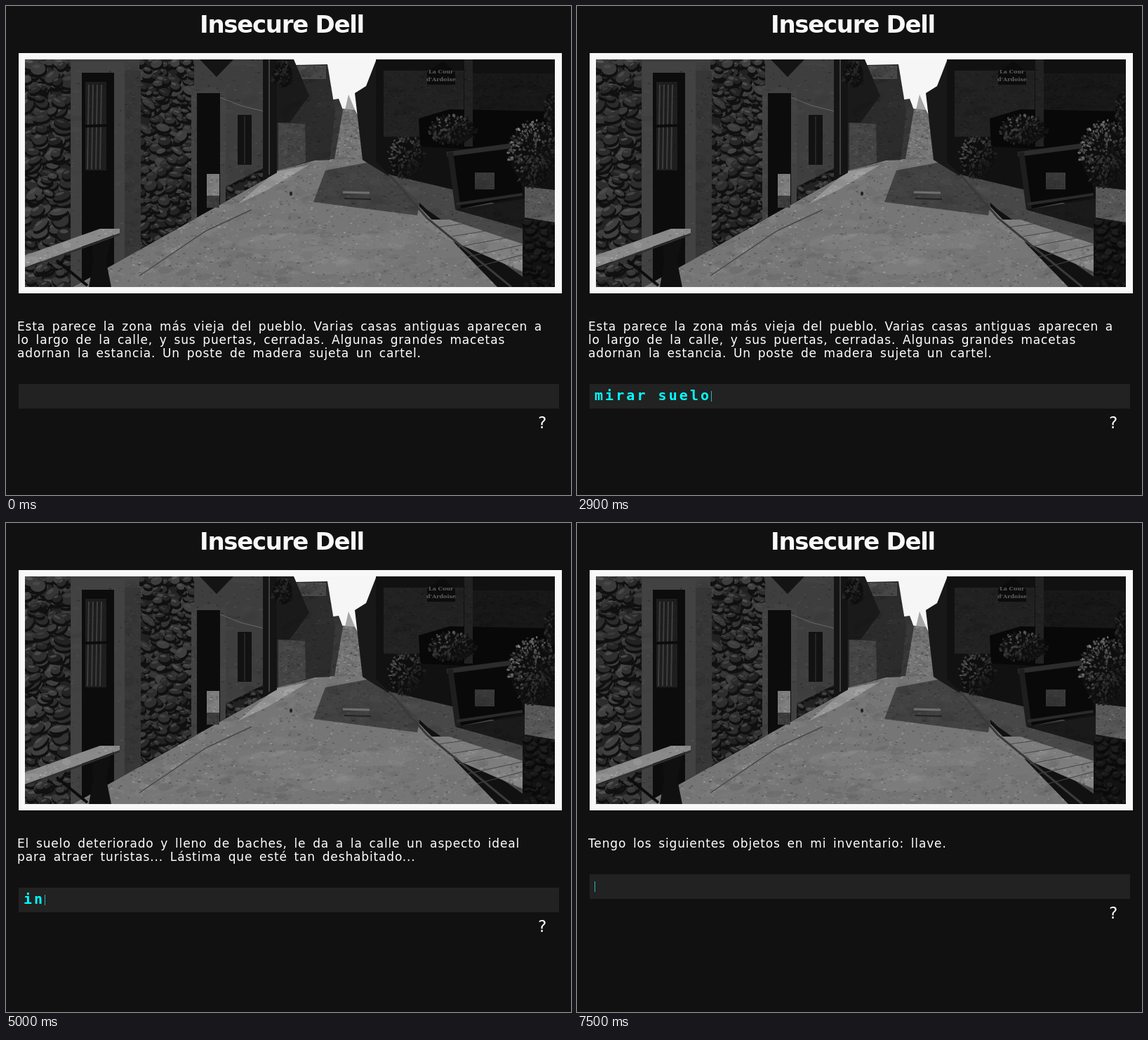
These frames come from a looping animation (805x696 px, 8 s). An HTML page with a canvas:

```html
<!DOCTYPE html>
<html lang="es">
<head>
<meta charset="utf-8">
<title>Insecure Dell</title>
<style>
  html, body { margin: 0; width: 100%; height: 100%; overflow: hidden; background: #111; }
  canvas, svg { position: absolute; left: 0; top: 0; width: 805px; height: 696px; }
  text { font-family: "DejaVu Sans", sans-serif; fill: #fff; white-space: pre; }
  #title { font-size: 34px; font-weight: bold; letter-spacing: -1.3px; text-anchor: middle; fill: #f8f8f8; }
  #story text { font-size: 17px; letter-spacing: .85px; word-spacing: 3.5px; }
  #help { font-size: 23px; }
  #typed { font: bold 20px "DejaVu Sans Mono", monospace; letter-spacing: 3.06px; fill: #0ff; }
</style>
</head>
<body>
<canvas id="photo" width="805" height="696"></canvas>
<svg viewBox="0 0 805 696">
  <text id="title" x="393" y="38">Insecure Dell</text>
  <g id="story">
    <text x="16" y="462"></text>
    <text x="16" y="481"></text>
    <text x="16" y="500"></text>
  </g>
  <g id="prompt">
    <rect x="18" y="538" width="770" height="35" fill="#222"/>
    <text id="typed" x="25" y="561"></text>
    <rect id="caret" y="548" width="1" height="15" fill="#2bb4bc"/>
    <text id="help" x="758" y="601">?</text>
  </g>
</svg>
<script>
const ctx = document.getElementById('photo').getContext('2d');
const LEFT = 27, TOP = 76, RIGHT = 782, BOTTOM = 400;

let seed = 7;
function rand() {
  seed = (seed + 0x6D2B79F5) | 0;
  let v = Math.imul(seed ^ (seed >>> 15), 1 | seed);
  v ^= v + Math.imul(v ^ (v >>> 7), 61 | v);
  return ((v ^ (v >>> 14)) >>> 0) / 4294967296;
}
const between = (a, b) => a + rand() * (b - a);
const gray = (v, alpha = 1) => `rgba(${v | 0},${v | 0},${v | 0},${alpha})`;

// Shapes are arrays of [x, y] corners.
const rect = (x0, y0, x1, y1) => [[x0, y0], [x1, y0], [x1, y1], [x0, y1]];

// The left facade meets the street along one receding line.
const kerb = x => 347 - (x - 190) * .56;
const facade = (x0, x1, top = TOP) => [[x0, top], [x1, top], [x1, kerb(x1)], [x0, kerb(x0)]];

function trace(shape) {
  ctx.beginPath();
  shape.forEach(p => ctx.lineTo(...p));
  ctx.closePath();
}

function fill(shade, shape) {
  ctx.fillStyle = gray(shade);
  trace(shape);
  ctx.fill();
}

function stroke(shade, width, ...points) {
  ctx.strokeStyle = gray(shade);
  ctx.lineWidth = width;
  ctx.beginPath();
  points.forEach(p => ctx.lineTo(...p));
  ctx.stroke();
}

function blob(x, y, rx, ry, turn, shade, alpha) {
  ctx.fillStyle = gray(shade, alpha);
  ctx.beginPath();
  ctx.ellipse(x, y, rx, ry, turn, 0, 7);
  ctx.fill();
}

// Calls draw(x, y) at random places inside a shape.
function scatter(count, shape, draw) {
  const xs = shape.map(p => p[0]), ys = shape.map(p => p[1]);
  ctx.save();
  trace(shape);
  ctx.clip();
  for (let i = 0; i < count; i++) {
    draw(between(Math.min(...xs), Math.max(...xs)), between(Math.min(...ys), Math.max(...ys)));
  }
  ctx.restore();
}

// A flat tone with soft mottling and fine specks.
function rough(shade, shape, count = 300) {
  fill(shade, shape);
  scatter(count / 5, shape, (x, y) =>
    blob(x, y, between(4, 16), between(2, 6), between(-.4, .2), shade * between(.6, 1.4), .18));
  scatter(count, shape, (x, y) => {
    ctx.fillStyle = gray(shade * between(.3, 1.7), .4);
    ctx.fillRect(x, y, between(1, 4), between(1, 2));
  });
}

function stones(count, size, shape) {
  fill(34, shape);
  scatter(count, shape, (x, y) => {
    const rx = size * between(.4, 1), ry = rx * between(.4, .8), turn = between(-.7, .6);
    blob(x + 1, y + 3, rx + 1, ry + 1, turn, 16);
    blob(x, y, rx, ry, turn, between(34, 66));
    blob(x - rx * .2, y - ry * .4, rx * .5, ry * .3, turn, between(60, 105), .6);
  });
}

function bush(x, y, rx, ry, light) {
  blob(x, y, rx, ry, 0, 14);
  for (let i = 0; i < rx * ry / 4; i++) {
    const a = between(0, 2 * Math.PI), d = Math.sqrt(rand()) * 1.08;
    const glow = .4 - .3 * Math.cos(a) * d - .3 * Math.sin(a) * d;
    blob(x + Math.cos(a) * d * rx, y + Math.sin(a) * d * ry,
      between(1, 3), between(.8, 2), a, 20 + light * Math.max(0, glow) * rand());
  }
}

function drawFarHouses() {
  fill(246, rect(410, TOP, 530, 230));
  fill(165, [[482, 152], [488, 126], [499, 152]]);
  rough(112, [[460, 156], [480, 146], [497, 148], [508, 168], [508, 222], [460, 222]]);
  rough(55, [[460, 134], [474, 132], [480, 148], [468, 218], [460, 218]], 60);
  rough(44, [[380, 96], [412, 84], [458, 83], [469, 150], [461, 222], [380, 236]]);
  rough(72, rect(411, 85, 456, 104), 60);
  rough(26, [[376, TOP], [410, TOP], [432, 128], [404, 166], [376, 166]], 60);
  rough(68, [[388, 166], [426, 168], [427, 222], [388, 234]], 150);
}

function drawStreet() {
  rough(118, [[380, 236], [440, 220], [522, 217], [BOTTOM + 300, BOTTOM], [LEFT, BOTTOM], [190, 346]], 2600);
  for (let i = 0; i < 4; i++) blob(390 + 45 * i, 335 + 18 * (i % 3), 60, 11, -.05, 155, .16);
  rough(150, [[384, 236], [432, 226], [372, 262], [330, 282]], 80);
  stroke(72, 1.5, [350, 290], [285, 320], [190, 384]);
  rough(66, [[455, 234], [524, 221], [590, 277], [586, 298], [438, 279]], 300);
  stroke(112, 3, [480, 265], [518, 266]);
  stroke(34, 2, [482, 274], [520, 275]);
  blob(406, 267, 2, 3, 0, 35);
}

function doorway(x0, x1, top, frame) {
  rough(66, facade(x0 - frame, x1 + frame, top - frame), 120);
  fill(12, facade(x0, x1, top));
}

function drawLeftWall() {
  rough(62, facade(LEFT, 372), 1200);
  stones(330, 14, facade(LEFT, 92));
  stones(420, 10, facade(190, 268));
  stones(60, 7, [[304, 262], [372, 228], [372, kerb(372)], [304, kerb(304)]]);

  rough(54, facade(150, 192, 92), 300);
  doorway(108, 154, 95, 15);
  rough(30, rect(113, 108, 143, 234), 40);
  for (let x = 118; x < 142; x += 6) stroke(62, 2, [x, 112], [x - 2, 232]);
  stroke(12, 4, [112, 171], [146, 170]);

  doorway(272, 305, 124, 8);
  rough(125, rect(286, 239, 304, 270), 20);
  rough(62, rect(286, 270, 304, 287), 20);
  fill(20, [[276, TOP], [324, TOP], [300, 101]]);
  stroke(105, 1, [305, 130], [335, 142], [368, 150]);
  fill(18, rect(330, 155, 350, 226));
  stroke(56, 1, [340, 157], [340, 225]);
  fill(20, facade(366, 386));
  stroke(64, 2, [375, TOP], [375, 240]);
  bush(394, 98, 14, 18, 60);
}

function drawRightSide() {
  fill(24, [[497, 124], [513, 114], [527, 78], [545, TOP], [545, 242], [508, 219]]);
  fill(17, [[527, TOP], [RIGHT, TOP], [RIGHT, 330], [640, 290], [546, 240], [527, 222]]);
  rough(34, rect(538, 92, 652, 186), 420);
  rough(24, rect(664, 96, RIGHT, 150), 320);
  fill(8, [[588, 160], [632, 147], [RIGHT, 150], [RIGHT, 210], [590, 200]]);
  fill(12, [[600, 94], [622, 78], [640, 94], [640, 112], [600, 112]]);
  ctx.fillStyle = gray(95);
  ctx.font = 'bold 8px "DejaVu Serif", serif';
  ctx.fillText('La Cour', 602, 96);
  ctx.fillText('d\'Ardoise', 599, 107);
  rough(34, rect(653, TOP, 665, 200), 40);

  const paving = [[546, 240], [640, 262], [740, 296], [740, 388], [600, 290]];
  rough(72, paving, 600);
  rough(125, [[584, 304], [632, 304], [740, 340], [740, 380], [625, 330]], 260);
  for (let y = 315; y < 380; y += 14) stroke(70, 1, [y + 300, y], [740, y - 18]);
  stroke(58, 3, [546, 240], [600, 302], [720, BOTTOM]);
  rough(26, [[640, 290], [740, 274], [740, 318]], 80);

  bush(570, 215, 25, 29, 100);
  bush(636, 176, 32, 20, 110);
  fill(9, [[630, 206], [720, 200], [738, 270], [642, 290]]);
  rough(56, rect(668, 237, 696, 261), 20);
  stroke(44, 7, [628, 211], [720, 199]);
  stroke(30, 8, [633, 208], [644, 289]);
  stroke(42, 4, [642, 282], [736, 268]);

  stones(70, 7, rect(736, 304, RIGHT, BOTTOM));
  ctx.fillStyle = gray(8, .6);
  ctx.fillRect(736, 304, RIGHT - 736, BOTTOM - 304);
  rough(88, [[739, 257], [RIGHT, 262], [RIGHT, 308], [739, 301]], 120);
  bush(776, 150, 9, 26, 70);
  bush(752, 211, 34, 45, 140);
}

function drawBench() {
  fill(16, [[122, 336], [150, 330], [143, 365], [150, BOTTOM], [118, BOTTOM], [124, 365]]);
  stroke(12, 4, [72, 362], [116, 398]);
  rough(138, [[LEFT, 355], [134, 317], [162, 317], [162, 323], [LEFT, 372]], 120);
  stroke(48, 2, [LEFT, 374], [162, 325]);
}

function drawPhoto() {
  ctx.fillStyle = '#f8f8f8';
  ctx.fillRect(18, 67, 774, 342);
  ctx.save();
  trace(rect(LEFT, TOP, RIGHT, BOTTOM));
  ctx.clip();
  fill(17, rect(LEFT, TOP, RIGHT, BOTTOM));
  [drawFarHouses, drawStreet, drawLeftWall, drawRightSide, drawBench].forEach(draw => draw());
  ctx.restore();
}

const LOOP = 8000, LINE = 19, PITCH = 15.1, TICK = 100, BLINK = 500;

// Keys hold what is typed on each tick; an empty entry is a pause.
const scenes = [
  { from: 0, focus: 800, typing: 1700, keys: 'm,i,r,a,r,, ,,s,ue,,l,o', lines: [
    'Esta parece la zona más vieja del pueblo. Varias casas antiguas aparecen a',
    'lo largo de la calle, y sus puertas, cerradas. Algunas grandes macetas',
    'adornan la estancia. Un poste de madera sujeta un cartel.'] },
  { from: 3200, focus: 3200, typing: 4800, keys: 'i,,n,,v,e,n,t,a,r,,i,,o', lines: [
    'El suelo deteriorado y lleno de baches, le da a la calle un aspecto ideal',
    'para atraer turistas... Lástima que esté tan deshabitado...'] },
  { from: 6600, focus: 6500, typing: LOOP, keys: '', lines: [
    'Tengo los siguientes objetos en mi inventario: llave.'] },
];

const storyLines = document.querySelectorAll('#story text');
const prompt = document.getElementById('prompt');
const typed = document.getElementById('typed');
const caret = document.getElementById('caret');

function render() {
  const t = performance.now() % LOOP;
  const { focus, typing, keys, lines } = scenes.findLast(s => s.from <= t);
  const ticks = Math.max(0, Math.floor((t - typing) / TICK) + 1);
  const command = keys.split(',').slice(0, ticks).join('');
  const blinkOn = t >= focus && Math.floor((t - focus) / BLINK) % 2 === 0;

  storyLines.forEach((el, i) => { el.textContent = lines[i] || ''; });
  prompt.setAttribute('transform', `translate(0 ${LINE * (lines.length - 3)})`);
  typed.textContent = command;
  caret.setAttribute('x', Math.round(25 + PITCH * command.length));
  caret.setAttribute('visibility', t >= typing || blinkOn ? 'visible' : 'hidden');
  requestAnimationFrame(render);
}

drawPhoto();
render();
</script>
</body>
</html>
```
